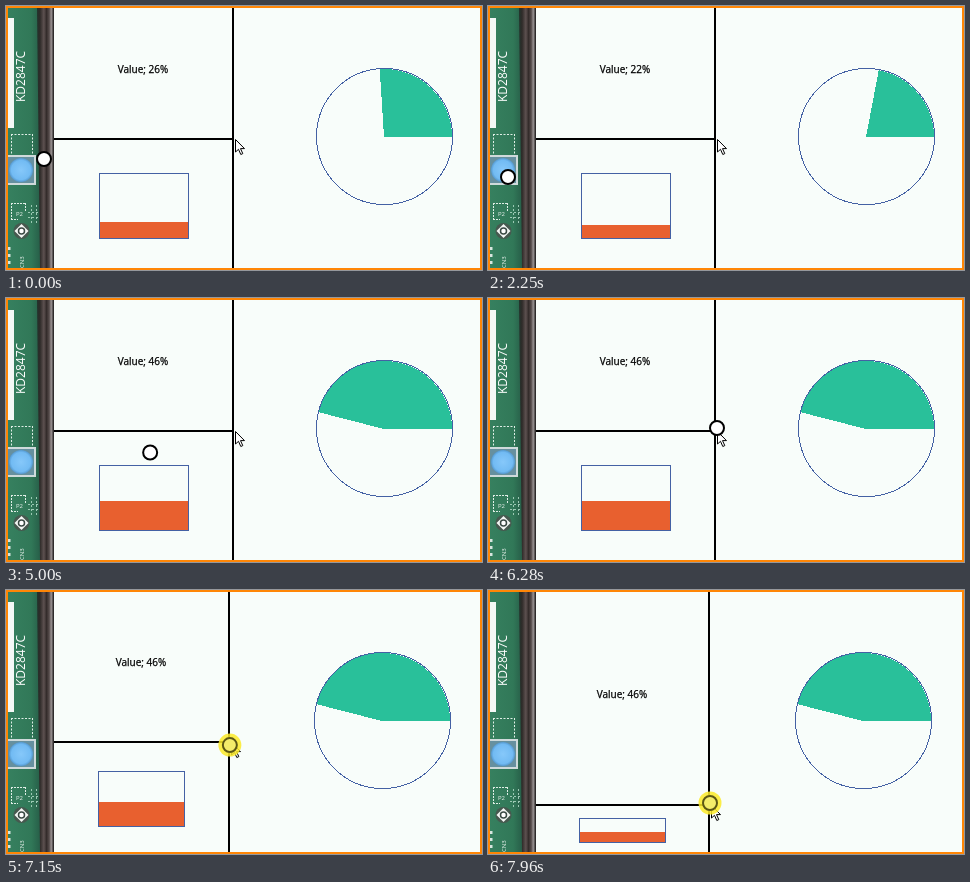
Write an HTML page that moves like this. It is 476 px wide and 264 px high and loops after 8000 ms.

```html
<!DOCTYPE html>
<html lang="en">
<head>
<meta charset="utf-8">
<title>Board value panels</title>
<style>
  html, body { margin: 0; width: 100%; height: 100%; overflow: hidden; background: #f8fdfa; }
  svg { display: block; width: 476px; height: 264px; }
  text { font-family: "Open Sans", "Noto Sans", sans-serif; }
  .crisp { shape-rendering: crispEdges; }
  .edge { fill: none; stroke: #4461a4; stroke-width: 1; }
</style>
</head>
<body>
<svg viewBox="0 0 476 264">
  <defs>
    <linearGradient id="pcb">
      <stop offset="0" stop-color="#36805f"/>
      <stop offset=".7" stop-color="#317858"/>
      <stop offset="1" stop-color="#265c47"/>
    </linearGradient>
    <linearGradient id="rim">
      <stop offset="0" stop-color="#22332c"/>
      <stop offset=".18" stop-color="#2f2b29"/>
      <stop offset=".4" stop-color="#5d5150"/>
      <stop offset=".56" stop-color="#342c2b"/>
      <stop offset=".72" stop-color="#564c4b"/>
      <stop offset=".84" stop-color="#9a9393"/>
      <stop offset="1" stop-color="#161414"/>
    </linearGradient>
    <radialGradient id="cap">
      <stop offset="0" stop-color="#86c8fa"/>
      <stop offset=".8" stop-color="#72bbf3"/>
      <stop offset="1" stop-color="#5599cf"/>
    </radialGradient>
  </defs>
  <rect width="476" height="264" fill="#f8fdfa"/>

  <!-- circuit board -->
  <rect x="2" y="2" width="33" height="260" fill="url(#pcb)"/>
  <path d="M31 2H48V262H34Z" fill="url(#rim)"/>
  <rect x="2" y="12" width="6" height="110" fill="#f4f8f6"/>
  <text transform="translate(19 96) rotate(-90)" font-size="12" fill="#fff">KD2847C</text>
  <g fill="none" stroke="#dfeee6">
    <path d="M5 128.5H26M26.5 128V148M5.5 128V148" stroke-dasharray="2 1.5"/>
    <path d="M5 197.5H20M5.5 197V214M5 213.5H12M19.5 197V206" stroke-dasharray="2 1"/>
    <path d="M22 206.5H33M22 211.5H33M25.5 199V217M30.5 199V217" stroke="#9cc9b4" stroke-dasharray="2 2"/>
  </g>
  <rect x="2" y="149" width="28" height="30" fill="#cfdadb"/>
  <rect x="2" y="151" width="26" height="26" fill="#66909f"/>
  <circle id="button" cx="15" cy="164" r="12" fill="url(#cap)"/>
  <text x="10" y="210" font-size="6" fill="#f0f6f2">P2</text>
  <circle cx="15.5" cy="225" r="8" fill="#46594f"/>
  <path d="M15.5 218L22.5 225L15.5 232L8.5 225Z" fill="#f4f6f4"/>
  <circle cx="15.5" cy="225" r="3" fill="#fff" stroke="#3b4a44" stroke-width="1.5"/>
  <text transform="translate(18 262) rotate(-90)" font-size="6" fill="#f0f6f2">CN3</text>
  <path d="M3 241V260" stroke="#d8e6df" stroke-width="3" stroke-dasharray="3 4"/>

  <!-- panels -->
  <text id="label" font-size="10" text-anchor="middle" fill="#000" stroke="#000" stroke-width=".25"></text>
  <path id="wedge" class="crisp" fill="#29c09a"/>
  <circle id="pie" class="edge crisp" cy="130.5" r="68"/>
  <rect id="bar" class="crisp" fill="#e8602f"/>
  <rect id="box" class="edge crisp"/>
  <path id="split" class="crisp" stroke="#000" stroke-width="2"/>

  <!-- pointer and touch marker -->
  <path id="arrow" d="M.5 .5V13L3.5 10.3L5.8 15.5L7.8 14.6L5.5 9.6H9.5Z" fill="#fff" stroke="#000" stroke-width="1"/>
  <g id="marker">
    <circle id="glow" r="11.5" fill="#fbea28" opacity=".85"/>
    <circle id="ring" r="7" stroke-width="2"/>
  </g>
  <rect class="crisp" x="1" y="1" width="474" height="262" fill="none" stroke="#ff8606" stroke-width="2"/>
</svg>
<script>
const LOOP = 8000, PANEL = 48, BOTTOM = 264;
const el = {};
document.querySelectorAll("[id]").forEach(n => el[n.id] = n);

const linear = p => p;
const smooth = p => p * p * (3 - 2 * p);
const power = k => p => p ** k;

// start, end, number of steps, x, y, easing of y, easing of x
const markerPath = { from: [38, 153], moves: [
  [70, 70, 1, 21, 163],
  [860, 930, 2, 20, 171],
  [4590, 5350, 12, 219, 144.5, smooth, smooth],
  [5750, 5900, 3, 229, 130],
  [6350, 6550, 3, 225, 131],
  [6700, 6700, 1, 225, 132],
  [6900, 7700, 13, 222, 202, power(1.16)],
  [7770, 7960, 3, 222, 213]
]};
const splitPath = { from: [227, 133], moves: [
  [6350, 6550, 3, 224, 133],
  [6700, 6700, 1, 224, 134],
  [6900, 7700, 13, 221, 203, power(1.4)],
  [7770, 7960, 3, 221, 215]
]};
const values = [[0, 26], [400, 2], [1260, 3], [2070, 22], [3000, 62], [3930, 46]];
const presses = [[400, 530], [1260, 1390], [2070, 2250], [3000, 3130], [3930, 4060], [6350, LOOP]];

function locate({ from, moves }, t) {
  let [x, y] = from;
  for (const [start, end, count, toX, toY, easeY = linear, easeX = linear] of moves) {
    if (t < start) break;
    const step = count > 1 ? Math.floor((t - start) / (end - start) * (count - 1) + 0.3) + 1 : 1;
    const p = Math.min(step, count) / count;
    x += (toX - x) * easeX(p);
    y += (toY - y) * easeY(p);
  }
  return [x, y];
}

function set(node, attrs) {
  for (const k in attrs) node.setAttribute(k, attrs[k]);
}

function drawPanels(x, y, value) {
  const width = x - PANEL, height = BOTTOM - y, part = value / 100;
  set(el.split, { d: `M${PANEL} ${y}H${Math.round(x)}M${Math.round(x)} 2V262` });

  set(el.label, { x: PANEL + width / 2 - 0.5, y: Math.round(y / 2 + 0.4) });
  el.label.textContent = `Value; ${value}%`;

  const left = Math.round(PANEL + width / 4), top = Math.round(y + height / 4 + 1);
  const w = Math.round(width / 2), h = Math.round(height / 2);
  const fill = value > 3 ? Math.floor(h * part) : 0;
  set(el.box, { x: left + 0.5, y: top + 0.5, width: w - 1, height: h - 1 });
  set(el.bar, { x: left, y: top + h - fill, width: w, height: fill });

  const cx = Math.round(378 + (x - 227) / 2), cy = 131, r = 68, a = part * 2 * Math.PI;
  set(el.pie, { cx: cx + 0.5 });
  set(el.wedge, { d: `M${cx} ${cy}H${cx + r}A${r} ${r} 0 ${part > 0.5 ? 1 : 0} 0 ` +
    `${cx + r * Math.cos(a)} ${cy - r * Math.sin(a)}Z` });
}

function draw(t) {
  const [sx, rawY] = locate(splitPath, t);
  const sy = Math.round(rawY);
  const [mx, my] = locate(markerPath, t);
  const value = values.filter(v => t >= v[0]).pop()[1];
  const down = presses.some(([a, b]) => t >= a && t < b);

  drawPanels(sx, sy, value);
  set(el.arrow, { transform: `translate(${Math.round(sx) + 2} ${sy})` });
  set(el.marker, { transform: `translate(${mx} ${my})` });
  set(el.glow, { visibility: down ? "visible" : "hidden" });
  set(el.ring, { fill: down ? "#f4ec6a" : "#fff", stroke: down ? "#5c5714" : "#000" });
  set(el.button, { fill: down && t < 5000 ? "#8cc6e8" : "url(#cap)" });
}

const begin = performance.now();
function tick() {
  draw((performance.now() - begin) % LOOP);
  requestAnimationFrame(tick);
}
tick();
</script>
</body>
</html>
```
